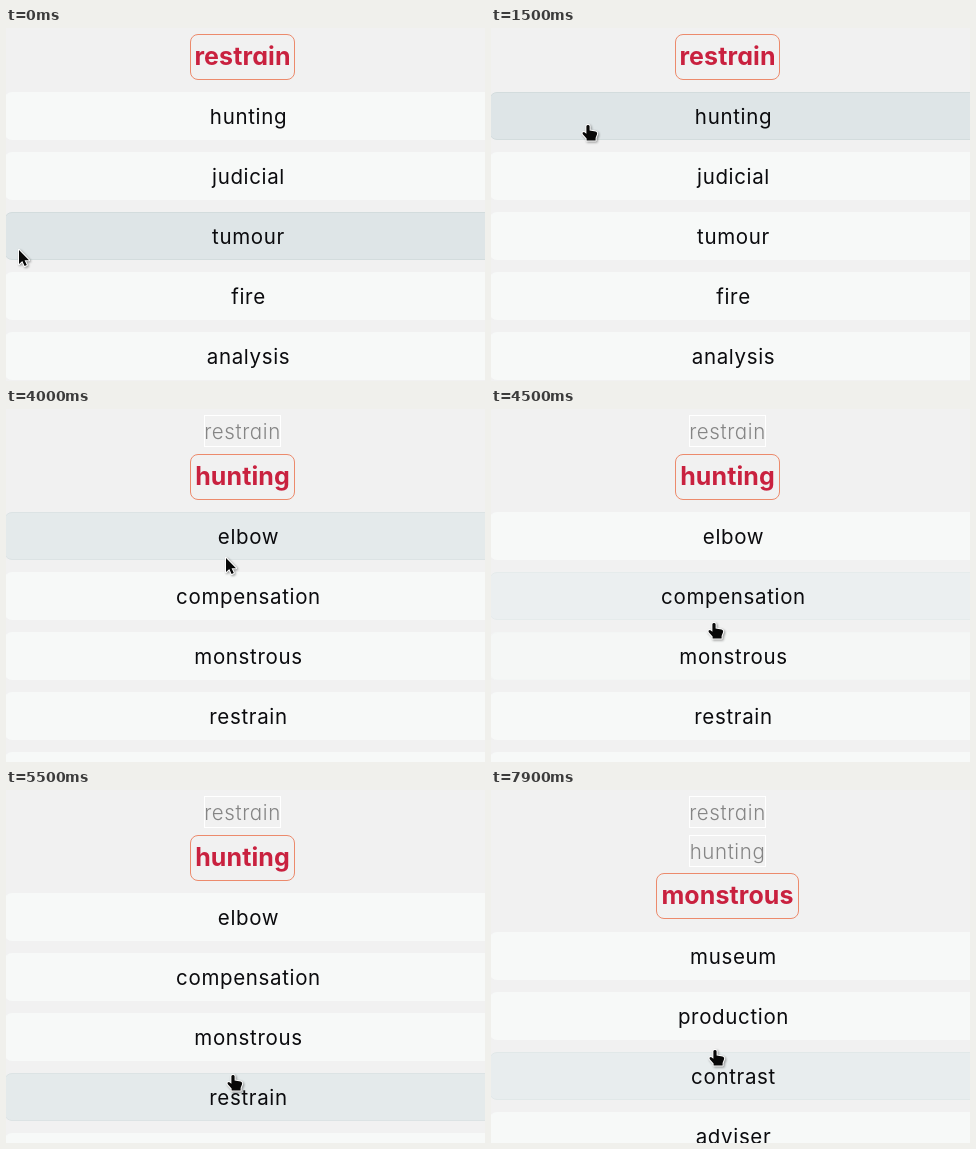
An HTML page that plays this animation: 479 px wide and 353 px high, repeating every 8000 ms.

```html
<!DOCTYPE html>
<html lang="en">
<head>
<meta charset="utf-8">
<style>
html, body { margin: 0; width: 100%; height: 100%; overflow: hidden; background: #f1f1f1; }
#stage { position: relative; width: 479px; height: 353px; overflow: hidden; }
#stage div {
  position: absolute; box-sizing: border-box; display: flex;
  align-items: center; justify-content: center;
  font-family: Inter, "Open Sans", sans-serif; white-space: nowrap;
}
.row {
  left: -2px; width: 489px; height: 48px; border: 1px solid; border-radius: 8px;
  font-size: 20.5px; letter-spacing: .65px; color: #0b0b0e;
}
.past, .head { font-feature-settings: "cv11"; }
.past {
  left: 198px; width: 77px; height: 32px; border: 1px solid #fff;
  font-size: 20.5px; font-weight: 300; letter-spacing: .6px; color: #858585;
}
.head {
  height: 46px; padding-bottom: 2px; border: 1px solid #ec8a6c; border-radius: 8px;
  font-size: 25px; font-weight: 700; letter-spacing: .1px; color: #c9213f;
}
svg { position: absolute; left: 0; top: 0; }
#cursor { filter: drop-shadow(1px 1.5px 1px #0006); }
</style>
</head>
<body>
<div id="stage"></div>
<script>
const LOOP = 8000, STEP = 100, FADE = 200;
const ARROW = "M0 0V14L3.3 11 5.6 16 7.8 15 5.6 10.2H10Z";
const HAND = "M-1.6 1.2Q-1.4 0 0 0T1.6 1.2V5.4L7.5 6.6Q9.2 7 9.2 8.8L7.6 13V15.5H-1.4V13.6L-5.4 9Q-6 7 -4 7L-1.6 8.8Z";

// hover: [row, time entered, time left]
const scenes = [
  { start: 0, past: [], head: "restrain", width: 105,
    rows: ["hunting", "judicial", "tumour", "fire", "analysis"],
    hover: [[2, -500, 650], [1, 750, 1000], [0, 1150, 9e3]] },
  { start: 2200, past: ["restrain"], head: "hunting", width: 105,
    rows: ["elbow", "compensation", "monstrous", "restrain", ""],
    hover: [[0, 3080, 3950], [1, 4080, 4400], [2, 4480, 4850], [3, 4950, 5450], [2, 5510, 9e3]] },
  { start: 6000, past: ["restrain", "hunting"], head: "monstrous", width: 143,
    rows: ["museum", "production", "contrast", "adviser", ""],
    hover: [[1, 6000, 7250], [2, 7780, 9e3]] }
];

// cursor: [time, x, y, shape from here on]
const path = [
  [0, 13, 222, ARROW], [100, 12, 218, HAND], [200, 12, 218, HAND], [400, 13, 212, HAND],
  [500, 13, 212, HAND], [900, 42, 160, HAND], [1400, 96, 99, HAND], [1500, 97, 97, HAND],
  [2200, 97, 97, ARROW], [3000, 98, 98, ARROW], [3100, 122, 106, HAND], [3400, 206, 130, HAND],
  [3800, 206, 130, HAND], [3900, 214, 138, HAND], [4000, 220, 149, ARROW], [4100, 221, 165, HAND],
  [4500, 223, 214, HAND], [4700, 226, 250, HAND], [5000, 230, 296, HAND], [5300, 230, 302, HAND],
  [5500, 227, 285, HAND], [5700, 226, 244, HAND], [7100, 226, 244, HAND], [7500, 224, 249, HAND],
  [7600, 224, 249, HAND], [7900, 224, 260, HAND], [LOOP, 224, 260, HAND]
];

const stage = document.getElementById("stage");
const clamp = v => Math.max(0, Math.min(1, v));
const mix = (a, b, k) => `rgb(${a.map((v, i) => Math.round(v + (b[i] - v) * k))})`;

function add(cls, top, text, width) {
  const el = document.createElement("div");
  el.className = cls;
  el.style.top = Math.round(top) + "px";
  el.textContent = text;
  if (width) {
    el.style.width = width + "px";
    el.style.left = Math.floor(236.5 - width / 2) + "px";
  }
  stage.append(el);
  return el;
}

let shown, rows, cursor;

function build(scene) {
  stage.innerHTML = "";
  const depth = scene.past.length;
  scene.past.forEach((word, i) => add("past", 6 + i * 38.6, word));
  add("head", 6 + depth * 38.6, scene.head, scene.width);
  rows = scene.rows.map((word, i) => add("row", 64 + depth * 39 + i * 60, word));
  stage.insertAdjacentHTML("beforeend",
    `<svg width="479" height="353"><path id="cursor" fill="#080808" stroke="#fff"
      stroke-width="2" stroke-linejoin="round" paint-order="stroke"/></svg>`);
  cursor = document.getElementById("cursor");
  shown = scene;
}

function draw(now) {
  const t = Math.floor(now % LOOP / STEP) * STEP;
  const scene = scenes.findLast(s => s.start <= t);
  if (scene !== shown) build(scene);

  const level = rows.map(() => 0);
  for (const [row, from, to] of scene.hover)
    level[row] += clamp((t - from) / FADE) - clamp((t - to) / FADE);
  rows.forEach((el, i) => {
    el.style.background = mix([247, 249, 248], [222, 229, 231], level[i]);
    el.style.borderColor = mix([247, 249, 248], [211, 220, 221], level[i]);
  });

  const i = path.findLastIndex(p => p[0] <= t);
  const [t0, x0, y0, shape] = path[i], [t1, x1, y1] = path[i + 1];
  const k = (t - t0) / (t1 - t0);
  cursor.setAttribute("d", shape);
  cursor.setAttribute("transform", `translate(${x0 + (x1 - x0) * k} ${y0 + (y1 - y0) * k})`);
}

const begin = performance.now();
function tick() {
  draw(performance.now() - begin);
  requestAnimationFrame(tick);
}
tick();
</script>
</body>
</html>
```
